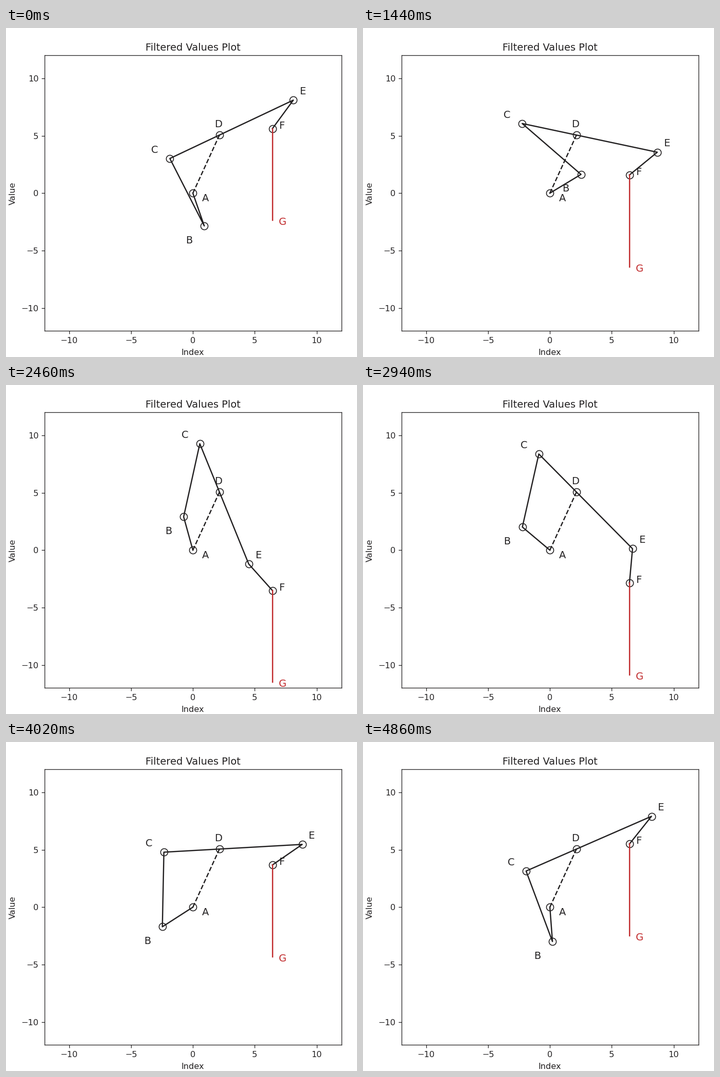
Animation of 682x640 px, one loop 4.92 s. Source, as a matplotlib script:

```python
import numpy as np
import matplotlib.pyplot as plt
from matplotlib.animation import FuncAnimation

W, H, DPI = 682, 640, 100
FRAMES, INTERVAL = 82, 60
K = 1.163  # zoom of all text and strokes
RED = "#c0292b"
INK = "#222021"

# Link lengths
AB, BC, CD, DE, EF, FG = 3, 6.5, 4.5, 6.7, 3, 8
A = np.array([0.0, 0.0])
D = 5.5 * np.array([np.cos(np.radians(67)), np.sin(np.radians(67))])
SLIDER_X = 6.43

# Crank angle in degrees at a few steps of the turn
STEPS = [0, 15, 24, 33, 49, 67, 81]
ANGLES = [-72.1, -6.5, 33, 71, 137.8, 214.7, 274]

# Label offsets from their joints, in data units
OFFSETS = {"A": (0.72, -0.7), "B": (-1.5, -1.5), "C": (-1.5, 0.5),
           "D": (-0.4, 0.7), "E": (0.5, 0.5), "F": (0.5, 0), "G": (0.5, -0.4)}

plt.rcParams.update({
    "font.family": "DejaVu Sans",
    "font.size": 10 * K,
    "axes.linewidth": 0.8 * K,
    "axes.titlepad": 6 * K,
    "axes.labelpad": 5 * K,
    "lines.linewidth": 1.5 * K,
    "text.color": INK,
    "axes.labelcolor": INK,
    "axes.edgecolor": INK,
})
for axis in ("xtick", "ytick"):
    plt.rcParams.update({
        f"{axis}.major.size": 3.5 * K,
        f"{axis}.major.width": 0.8 * K,
        f"{axis}.major.pad": 3.5 * K,
        f"{axis}.color": INK,
    })


def joints(step):
    """Positions of all joints at one step of the crank."""
    t = np.radians(np.interp(step, STEPS, ANGLES))
    b = AB * np.array([np.cos(t), np.sin(t)])

    # C is where the circles round B and D meet, left of the line B-D
    gap = np.hypot(*(D - b))
    u = (D - b) / gap
    along = (BC**2 - CD**2 + gap**2) / (2 * gap)
    side = np.sqrt(max(BC**2 - along**2, 0))
    c = b + along * u + side * np.array([-u[1], u[0]])

    e = D + (D - c) * DE / CD
    drop = np.sqrt(max(EF**2 - (SLIDER_X - e[0])**2, 0))
    f = np.array([SLIDER_X, e[1] - drop])
    g = f - (0, FG)
    return dict(zip("ABCDEFG", (A, b, c, D, e, f, g)))


fig = plt.figure(figsize=(W / DPI, H / DPI), dpi=DPI, facecolor="white")
ax = fig.add_axes([74.6 / W, 50.7 / H, 577 / W, 536 / H], facecolor="white")
ax.set(xlim=(-12, 12), ylim=(-12, 12), title="Filtered Values Plot",
       xlabel="Index", ylabel="Value")
ax.set_xticks(range(-10, 11, 5))
ax.set_yticks(range(-10, 11, 5))

ax.plot([A[0], D[0]], [A[1], D[1]], "--", color=INK)
chain, = ax.plot([], [], "-o", color=INK, mfc="none", ms=8.7 * K, mew=K)
rod, = ax.plot([], [], color=RED)
labels = {name: ax.text(0, 0, name, fontsize=12 * K,
                        color=RED if name == "G" else INK)
          for name in OFFSETS}


def update(step):
    pts = joints(step)
    chain.set_data(*np.transpose([pts[n] for n in "ABCDEF"]))
    rod.set_data(*np.transpose([pts[n] for n in "FG"]))
    for name, label in labels.items():
        label.set_position(pts[name] + OFFSETS[name])
    return [chain, rod, *labels.values()]


anim = FuncAnimation(fig, update, frames=FRAMES, interval=INTERVAL,
                     repeat=True, repeat_delay=0)
plt.show()
```
